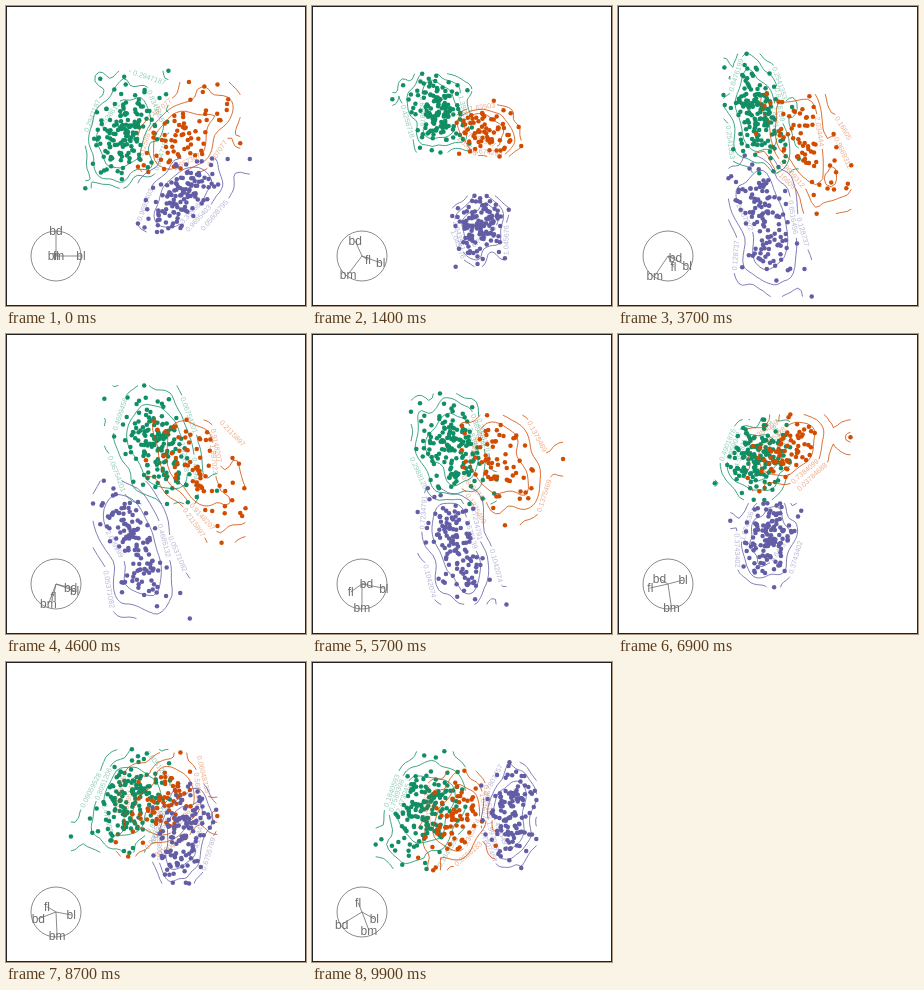
An HTML page with a canvas that plays this animation: 300 px wide and 300 px high, repeating every 10 s.

```html
<!DOCTYPE html>
<html lang="en">
<head>
<meta charset="utf-8">
<title>Tour of four measurements</title>
<style>
  html, body { margin: 0; width: 100%; height: 100%; overflow: hidden; background: #fff; }
  canvas { display: block; width: 300px; height: 300px; }
</style>
</head>
<body>
<canvas id="stage" width="300" height="300"></canvas>
<script>
const ctx = document.getElementById('stage').getContext('2d');
const STEP = 100, STEPS = 100;
const SCALE = 164.5;      // pixels per full range of a variable
const PLOT_UNIT = 138.9;  // pixels per plot unit, for density values
const GRID = 25;
const GREY = '#6e6e6e';
const NAMES = ['bl', 'bd', 'fl', 'bm'];
const CENTER = [43.92, 17.15, 200.9, 4202];
const RANGE = [27.5, 8.4, 59, 3600];

// corr: bl-bd, bl-fl, bl-bm, bd-fl, bd-bm, fl-bm
const GROUPS = [
  { color: '#108e64', n: 151, mean: [38.79, 18.35, 189.95, 3701], sd: [2.66, 1.22, 6.54, 459],
    corr: [.39, .33, .55, .31, .58, .47],
    extremes: [[32.1, 15.5, 188, 3050], [34.6, 21.1, 198, 4400], [46, 21.5, 194, 4200],
      [37.9, 18.6, 172, 3150], [44.1, 18, 210, 4000], [43.2, 19, 197, 4775],
      [45.8, 18.9, 197, 4150], [38.6, 21.2, 191, 3800], [36.4, 17.1, 184, 2850], [45.6, 20.3, 191, 4600]] },
  { color: '#d14c01', n: 68, mean: [48.83, 18.42, 195.8, 3733], sd: [3.34, 1.14, 7.13, 384],
    corr: [.65, .47, .51, .58, .60, .64],
    extremes: [[58, 17.8, 181, 3700], [40.9, 16.6, 187, 3200], [52, 20.7, 210, 4800],
      [46.9, 16.6, 192, 2700], [54.2, 20.8, 201, 4300], [55.8, 19.8, 207, 4000],
      [42.4, 17.3, 181, 3600], [43.5, 18.1, 202, 3400]] },
  { color: '#625da5', n: 123, mean: [47.5, 14.98, 217.2, 5076], sd: [3.08, .98, 6.48, 504],
    corr: [.64, .66, .67, .71, .72, .70],
    extremes: [[59.6, 17, 230, 6050], [49.2, 15.2, 221, 6300], [40.9, 13.7, 214, 4650],
      [54.3, 15.7, 231, 5650], [55.9, 17, 228, 5600], [48.4, 14.4, 203, 4625],
      [46.2, 14.1, 217, 4375], [44.9, 13.3, 213, 5100], [42, 13.5, 210, 4150], [50.5, 15.2, 216, 5000]] }
];

// Projection stops: x and y weight of each variable
const STOPS = [
  { at: 0, m: [[1, 0], [0, 1], [0, 0], [0, 0]] },
  { at: 14, m: [[.76, -.28], [-.28, .6], [.24, -.16], [-.56, -.72]] },
  { at: 28, m: [[.6, -.52], [-.06, 0], [.48, -.4], [-.62, -.8]] },
  { at: 46, m: [[.74, -.3], [.58, -.16], [-.1, -.52], [-.3, -.84]] },
  { at: 69, m: [[.6, .16], [-.34, .22], [-.7, -.16], [.14, -.96]] },
  { at: 87, m: [[.6, -.12], [-.7, -.28], [-.36, .22], [.04, -.96]] },
  { at: 99, m: [[.5, -.28], [-.82, -.5], [-.16, .38], [.28, -.74]] }
];

let seed = 20;
function random() {
  seed = (seed + 0x6D2B79F5) | 0;
  let t = Math.imul(seed ^ (seed >>> 15), 1 | seed);
  t = (t + Math.imul(t ^ (t >>> 7), 61 | t)) ^ t;
  return ((t ^ (t >>> 14)) >>> 0) / 4294967296;
}
const gauss = () => Math.sqrt(-2 * Math.log(1 - random())) * Math.cos(2 * Math.PI * random());

function cholesky([a, b, c, d, e, f]) {
  const m = [[1, a, b, c], [a, 1, d, e], [b, d, 1, f], [c, e, f, 1]];
  const l = m.map(() => [0, 0, 0, 0]);
  for (let i = 0; i < 4; i++) {
    for (let j = 0; j <= i; j++) {
      let s = m[i][j];
      for (let k = 0; k < j; k++) s -= l[i][k] * l[j][k];
      l[i][j] = i === j ? Math.sqrt(s) : s / l[j][j];
    }
  }
  return l;
}

function sample(group) {
  const l = cholesky(group.corr);
  const rows = group.extremes.slice();
  while (rows.length < group.n) {
    const g = [gauss(), gauss(), gauss(), gauss()];
    const z = l.map(r => r.reduce((s, v, k) => s + v * g[k], 0));
    if (z.every(v => Math.abs(v) < 2.2)) rows.push(z.map((v, k) => group.mean[k] + v * group.sd[k]));
  }
  return rows.map(r => r.map((v, k) => (v - CENTER[k]) / RANGE[k]));
}
for (const g of GROUPS) g.data = sample(g);

function orthonormal(m) {
  let a = 0, b = 0, d = 0;
  for (const [x, y] of m) { a += x * x; b += x * y; d += y * y; }
  const s = Math.sqrt(a * d - b * b), t = s * Math.sqrt(a + d + 2 * s);
  return m.map(([x, y]) => [(x * (d + s) - y * b) / t, (y * (a + s) - x * b) / t]);
}

function projection(step) {
  let i = 0;
  while (i < STOPS.length - 2 && step >= STOPS[i + 1].at) i++;
  const p = STOPS[i], q = STOPS[i + 1];
  const u = (step - p.at) / (q.at - p.at);
  return orthonormal(p.m.map((r, k) => r.map((v, c) => v + (q.m[k][c] - v) * u)));
}

const project = (data, m) => data.map(r => {
  let x = 0, y = 0;
  r.forEach((v, k) => { x += v * m[k][0]; y += v * m[k][1]; });
  return [150 + SCALE * x, 150 - SCALE * y];
});

function quantile(sorted, p) {
  const h = (sorted.length - 1) * p, i = Math.floor(h);
  return sorted[i] + (h - i) * ((sorted[i + 1] ?? sorted[i]) - sorted[i]);
}

const ascending = a => Array.from(a).sort((p, q) => p - q);

// Kernel weights of all points along one axis
function kernel(values) {
  const n = values.length, s = ascending(values);
  const mean = s.reduce((a, b) => a + b) / n;
  const sd = Math.sqrt(s.reduce((a, v) => a + (v - mean) ** 2, 0) / (n - 1));
  const iqr = (quantile(s, .75) - quantile(s, .25)) / 1.34;
  const h = 1.06 * Math.min(sd, iqr) * n ** -.2;
  const min = s[0], gap = (s[n - 1] - min) / (GRID - 1);
  const w = values.map(v => Array.from({ length: GRID }, (_, i) =>
    Math.exp(-.5 * ((min + i * gap - v) / h) ** 2) / (h * Math.sqrt(2 * Math.PI))));
  return { min, gap, w };
}

function density(points) {
  const kx = kernel(points.map(p => p[0])), ky = kernel(points.map(p => p[1]));
  const z = new Float64Array(GRID * GRID), f = PLOT_UNIT ** 2 / points.length;
  for (let p = 0; p < points.length; p++)
    for (let j = 0; j < GRID; j++)
      for (let i = 0; i < GRID; i++) z[j * GRID + i] += f * kx.w[p][i] * ky.w[p][j];
  return { z, kx, ky };
}

// Marching squares, joined into polylines
function contours({ z, kx, ky }, level) {
  const links = new Map(), spot = new Map();
  const edge = (i, j, down) => {
    const a = j * GRID + i, b = a + (down ? GRID : 1);
    if ((z[a] > level) === (z[b] > level)) return -1;
    const id = 2 * a + down, f = (level - z[a]) / (z[b] - z[a]);
    spot.set(id, [kx.min + (i + (down ? 0 : f)) * kx.gap, ky.min + (j + (down ? f : 0)) * ky.gap]);
    return id;
  };
  const link = (a, b) => {
    for (const [p, q] of [[a, b], [b, a]]) {
      if (!links.has(p)) links.set(p, []);
      links.get(p).push(q);
    }
  };
  for (let j = 0; j < GRID - 1; j++) {
    for (let i = 0; i < GRID - 1; i++) {
      const e = [edge(i, j, 0), edge(i + 1, j, 1), edge(i, j + 1, 0), edge(i, j, 1)];
      const hit = e.filter(v => v >= 0);
      if (hit.length === 2) link(hit[0], hit[1]);
      if (hit.length === 4) {
        const k = j * GRID + i;
        const mid = (z[k] + z[k + 1] + z[k + GRID] + z[k + GRID + 1]) / 4;
        const same = (mid > level) === (z[k] > level);
        link(e[0], e[same ? 1 : 3]);
        link(e[2], e[same ? 3 : 1]);
      }
    }
  }
  const seen = new Set(), lines = [];
  const trace = start => {
    const line = [];
    let at = start;
    while (at !== undefined) {
      seen.add(at);
      line.push(spot.get(at));
      at = links.get(at).find(v => !seen.has(v));
    }
    if (links.get(start).length === 2) line.push(line[0]);
    lines.push(line);
  };
  for (const [id, l] of links) if (l.length === 1 && !seen.has(id)) trace(id);
  for (const id of links.keys()) if (!seen.has(id)) trace(id);
  return lines;
}

const dist = (p, q) => Math.hypot(p[0] - q[0], p[1] - q[1]);

// Straightest stretch that is long enough for the label
function flattest(line, width) {
  let best = null, score = Infinity;
  for (let i = 0; i < line.length - 1; i++) {
    let arc = 0;
    for (let j = i + 1; j < line.length; j++) {
      arc += dist(line[j - 1], line[j]);
      const chord = dist(line[i], line[j]);
      if (chord < width) continue;
      if (arc / chord < score) { score = arc / chord; best = [i, j]; }
      break;
    }
  }
  return best;
}

function stroke(line) {
  if (line.length < 2) return;
  ctx.beginPath();
  line.forEach(p => ctx.lineTo(p[0], p[1]));
  ctx.stroke();
}

function drawContour(line, label) {
  const width = ctx.measureText(label).width;
  const span = flattest(line, width + 3);
  if (!span) return stroke(line);
  const [i, j] = span;
  stroke(line.slice(0, i + 1));
  stroke(line.slice(j));
  let [p, q] = [line[i], line[j]];
  if (q[0] < p[0]) [p, q] = [q, p];
  ctx.save();
  ctx.translate((p[0] + q[0]) / 2, (p[1] + q[1]) / 2);
  ctx.rotate(Math.atan2(q[1] - p[1], q[0] - p[0]));
  ctx.globalAlpha = .45;
  ctx.fillText(label, 0, 2.5);
  ctx.restore();
}

function drawGroup(group, m) {
  const points = project(group.data, m);
  const field = density(points), sorted = ascending(field.z);
  ctx.strokeStyle = ctx.fillStyle = group.color;
  ctx.lineWidth = .8;
  ctx.font = '7.2px "Liberation Sans", Arial, sans-serif';
  for (const share of [.25, .5, .75]) {
    const level = quantile(sorted, share);
    const label = String(Number(level.toPrecision(7)));
    for (const line of contours(field, level)) drawContour(line, label);
  }
  for (const [x, y] of points) {
    ctx.beginPath();
    ctx.arc(x, y, 2.25, 0, 2 * Math.PI);
    ctx.fill();
  }
}

function drawAxes(m) {
  ctx.strokeStyle = ctx.fillStyle = GREY;
  ctx.lineWidth = .8;
  ctx.font = '12px "Liberation Sans", Arial, sans-serif';
  ctx.beginPath();
  ctx.arc(50, 250, 25, 0, 2 * Math.PI);
  ctx.stroke();
  m.forEach(([x, y], k) => {
    const end = [50 + 25 * x, 250 - 25 * y];
    stroke([[50, 250], end]);
    ctx.fillText(NAMES[k], end[0], end[1] + 4.3);
  });
}

function draw(step) {
  const m = projection(step);
  ctx.fillStyle = '#fff';
  ctx.fillRect(0, 0, 300, 300);
  ctx.textAlign = 'center';
  drawAxes(m);
  for (const g of GROUPS) drawGroup(g, m);
  ctx.strokeStyle = '#222';
  ctx.lineWidth = 1;
  ctx.strokeRect(.5, .5, 299, 299);
}

let shown = -1;
const begin = performance.now();
function tick() {
  const step = Math.floor((performance.now() - begin) / STEP) % STEPS;
  if (step !== shown) draw(shown = step);
  requestAnimationFrame(tick);
}
tick();
</script>
</body>
</html>
```
